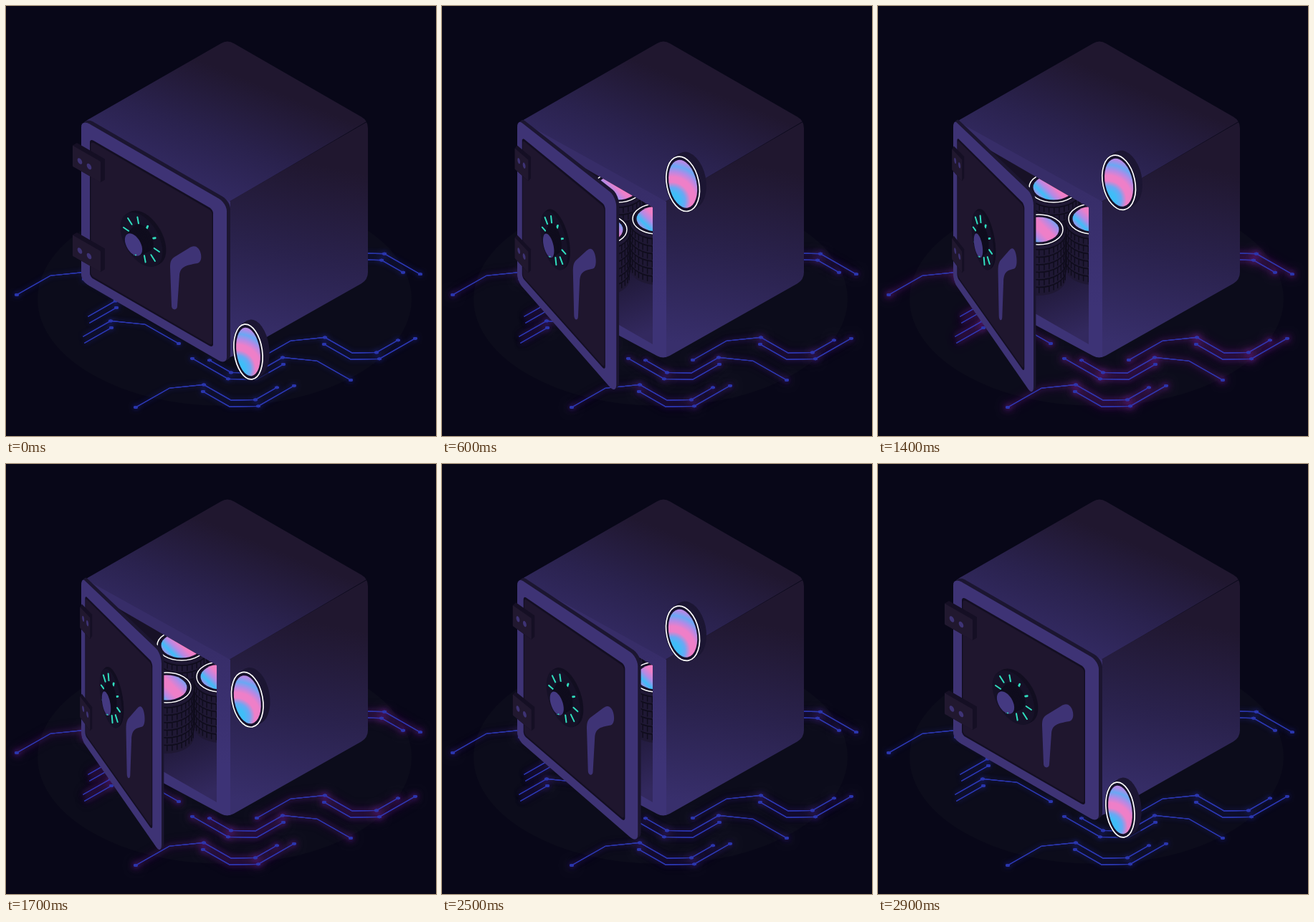
Write an HTML page with a canvas that moves like this. It is 600 by 600 pixels and loops after 3000 ms.

```html
<!DOCTYPE html>
<html lang="en">
<head>
<meta charset="utf-8">
<title>Vault</title>
<style>
html, body { margin: 0; width: 100%; height: 100%; overflow: hidden; background: #080718; }
canvas { display: block; width: 600px; height: 600px; }
</style>
</head>
<body>
<canvas id="stage" width="600" height="600"></canvas>
<script>
const ctx = document.getElementById('stage').getContext('2d');
const LOOP = 3000, STEP = 100;
const PURPLE = '#3e3375', DARK = '#1f162e', TEAL = '#30dfbf';
const PINK = '#ee7fc8', LILAC = '#b48ae6', SKY = '#6aa8f4', CYAN = '#3fbdf8';
const ISO = .577;
const TURNS = [0, 500, 985, 1500, 1950, 2450, 2900];

const mix = (a, b, k) => a + (b - a) * k;
const clamp = v => Math.min(1, Math.max(0, v));

// cubic-bezier(a, 0, 1 - a, 1), solved by bisection
function ease(x, a) {
  let lo = 0, hi = 1, t = x;
  for (let i = 0; i < 24; i++) {
    t = (lo + hi) / 2;
    const bx = 3 * a * t * (1 - t) ** 2 + 3 * (1 - a) * t * t * (1 - t) + t ** 3;
    if (bx < x) lo = t; else hi = t;
  }
  return t * t * (3 - 2 * t);
}
const ramp = (t, from, to, a) => ease(clamp((t - from) / (to - from)), a);

const doorAt = t => ramp(t, 50, 900, .42) - ramp(t, 2040, 2880, .42);
const glowAt = t => 1 - Math.abs(t - 1450) / 1450;
// the coin alternates between floor (0) and top (1)
function coinAt(t) {
  const i = Math.max(1, TURNS.findIndex(turn => t <= turn));
  const k = ramp(t, TURNS[i - 1], TURNS[i], .52);
  return i % 2 ? k : 1 - k;
}

function trace(pts) {
  ctx.beginPath();
  pts.forEach(p => ctx.lineTo(...p));
}

function fill(pts, color) {
  trace(pts);
  ctx.fillStyle = color;
  ctx.fill();
}

function rounded(pts, r) {
  const end = pts[pts.length - 1];
  ctx.beginPath();
  ctx.moveTo((end[0] + pts[0][0]) / 2, (end[1] + pts[0][1]) / 2);
  pts.forEach((p, i) => ctx.arcTo(...p, ...pts[(i + 1) % pts.length], r));
  ctx.closePath();
}

function oval(x, y, rx, ry, color, rot = 0) {
  ctx.beginPath();
  ctx.ellipse(x, y, rx, ry, rot, 0, 7);
  ctx.fillStyle = color;
  ctx.fill();
}

function ring(x, y, rx, ry, width, rot = 0) {
  ctx.beginPath();
  ctx.ellipse(x, y, rx, ry, rot, 0, 7);
  ctx.strokeStyle = '#fff';
  ctx.lineWidth = width;
  ctx.stroke();
}

// colours are spread evenly along the gradient
function spread(g, ...colors) {
  colors.forEach((c, i) => g.addColorStop(i / (colors.length - 1), c));
  return g;
}
const linear = (x0, y0, x1, y1, ...colors) =>
  spread(ctx.createLinearGradient(x0, y0, x1, y1), ...colors);

// Every circuit is the same pair of traces, mirrored or cut short.
function circuit(lines, dots, x, y, mx = 1, my = 1, legs = 5) {
  const run = (px, py, steps, nodeAt) => {
    const pts = [[px, py]];
    steps.forEach(([dx, slope]) => {
      px += dx * mx;
      py += dx * slope * my;
      pts.push([px, py]);
    });
    lines.push(pts);
    dots.push(...pts.filter((_, i) => nodeAt.includes(i)));
  };
  const up = -.57, down = .57;
  run(x, y, [[47, up], [48, -.1], [38, down], [34, -.02], [30, up]].slice(0, legs), [0, 2, 4, 5]);
  run(x + 94 * mx, y - 22 * my, [[37, down], [40, -.02], [50, up]].slice(0, legs - 2), [0, 2, 3].slice(0, legs - 2));
}

const lines = [], dots = [];
circuit(lines, dots, 15, 403);
circuit(lines, dots, 181, 560);
circuit(lines, dots, 350, 494);
circuit(lines, dots, 481, 522, -1);
circuit(lines, dots, 241, 471, -1, 1, 3);
circuit(lines, dots, 248, 443, -1, 1, 3);
circuit(lines, dots, 357, 344, 1, -1);

function drawCircuits(color, blur) {
  ctx.shadowColor = color;
  ctx.shadowBlur = blur;
  lines.forEach(pts => {
    trace(pts);
    ctx.stroke();
  });
  dots.forEach(([x, y]) => oval(x, y, 2.9, 1.9, ctx.strokeStyle));
}

function drawFloor(glow) {
  ctx.fillStyle = '#080718';
  ctx.fillRect(0, 0, 600, 600);
  oval(305, 409, 261, 149, '#0c0c1b');
  ctx.save();
  ctx.lineWidth = 1.2;
  ctx.strokeStyle = '#2a36ad';
  drawCircuits(`rgba(45,50,200,${.8 - .4 * glow})`, 7);
  for (const blur of [8, 15]) drawCircuits(`rgba(150,30,150,${glow})`, blur);
  ctx.restore();
}

function drawStack(x, y, base) {
  const rx = 38, ry = 23;
  ctx.beginPath();
  ctx.moveTo(x - rx, y);
  ctx.ellipse(x, base, rx, ry, 0, Math.PI, 0, true);
  ctx.lineTo(x + rx, y);
  ctx.fillStyle = '#1f1834';
  ctx.fill();
  ctx.beginPath();
  for (let row = y + 5; row < base - 4; row += 10.5) {
    for (let a = -1.5; a <= 1.5; a += .19) {
      const px = x + rx * Math.sin(a), py = row + ry * Math.cos(a);
      ctx.moveTo(px, py);
      ctx.lineTo(px, py + 7.5);
    }
    ctx.moveTo(x + rx, row);
    ctx.ellipse(x, row, rx, ry, 0, 0, Math.PI);
  }
  ctx.strokeStyle = '#0f0c1c';
  ctx.lineWidth = 1.5;
  ctx.stroke();
  oval(x, y, rx, ry, '#171228');
  ring(x, y, 34, 21, 1.5);
  oval(x, y, 28.5, 17.5, linear(x - 18, y + 18, x + 18, y - 18, LILAC, CYAN, LILAC, PINK, PINK, LILAC, SKY));
}

function drawBox() {
  ctx.save();
  rounded([[105, 164], [309, 47], [505, 160], [505, 382], [309, 493], [105, 384]], 18);
  ctx.clip();
  fill([[100, 160], [309, 40], [512, 156], [312, 273]],
    linear(350, 108, 280, 280, '#20172f', '#2a224e', '#352c67'));
  fill([[311, 273], [512, 157], [512, 390], [311, 500]],
    linear(430, 220, 378, 480, '#20172f', '#2a224d', '#382f6c'));
  fill([[100, 155], [313, 273], [313, 500], [100, 384]],
    linear(0, 250, 0, 420, '#372d68', '#3d3376'));
  trace([[118, 179], [294, 281], [294, 472], [118, 371]]);
  ctx.clip();
  ctx.fillStyle = linear(190, 300, 250, 470, '#171126', '#1f1837', '#33295f');
  ctx.fillRect(100, 150, 200, 340);
  drawStack(245, 253, 345);
  drawStack(300, 297, 366);
  drawStack(224, 312, 381);
  ctx.restore();
}

// Takes points on the shut door and projects them for the opening k.
function doorMap(k) {
  const w = 203 - 91 * (.85 * k + .15 * k * k);
  const top = 117 - 11 * (1.5 * k - .5 * k * k);
  const bottom = 117 + 44 * (1.97 * k - .97 * k * k);
  const grow = bottom - top, depth = 228 / (228 + grow);
  return ([x, y]) => {
    const u = (x - 105) / 203, v = (y - 156 - 117 * u) / 228;
    const s = u * depth / (1 - u + depth * u);
    return [105 + s * w, 156 + s * top + v * (228 + s * grow)];
  };
}

const skew = (x, y) => [x, y + ISO * (x - 105)];

// rounded rectangle lying in the door plane
function plate(l, t, r, b, rad) {
  const pts = [];
  for (let i = 0; i < 28; i++) {
    const corner = Math.floor(i / 7), a = (corner + i % 7 / 6) * Math.PI / 2;
    const cx = corner === 0 || corner === 3 ? r - rad : l + rad;
    const cy = corner < 2 ? b - rad : t + rad;
    pts.push(skew(cx + rad * Math.cos(a), cy + rad * Math.sin(a)));
  }
  return pts;
}

function drawDoor(k) {
  const map = doorMap(k);
  const shape = (pts, color) => fill(pts.map(map), color);
  const onDial = (x, y, r, a) => [x + .866 * r * Math.cos(a), y + .5 * r * Math.cos(a) + r * Math.sin(a)];
  const disc = (x, y, r, color) =>
    shape(Array.from({ length: 40 }, (_, i) => onDial(x, y, r, i * Math.PI / 20)), color);

  const face = plate(105, 158, 308, 384, 11).map(map);
  for (let i = 4; i > 0; i--) {
    fill(face.map(([x, y]) => [x + i * (1.25 - .4 * k), y - i * .75]), '#1c1631');
  }
  fill(face, PURPLE);
  shape(plate(117, 178, 289, 371, 5), '#130e22');
  shape(plate(118.5, 181, 287.5, 368.5, 4), DARK);

  const left = 93 + 8 * k;
  for (const y of [201.5, 326.5]) {
    const top = y - 7, bottom = y + 22;
    shape([skew(left, top + 7), skew(left + 6, top), skew(138, top), skew(138, bottom), skew(132, bottom + 7), skew(left, bottom + 7)], '#150f24');
    shape(plate(left, y, 132, bottom + 7, 1), '#21182f');
    disc(left + 10, y + 15, 3.8, PURPLE);
    disc(left + 23, y + 22.5, 3.8, PURPLE);
  }

  for (let i = 5; i >= 0; i--) disc(189 + i, 326 - i * .5, 34, i ? '#120e20' : '#161127');
  ctx.lineCap = 'round';
  ctx.strokeStyle = TEAL;
  for (let i = 0; i < 10; i++) {
    const a = (5 + 36 * i) * Math.PI / 180, thick = i > 7;
    trace([thick ? 22 : 20.5, thick ? 26 : 29].map(r => map(onDial(189, 326, r, a))));
    ctx.lineWidth = thick ? 2.8 : 2;
    ctx.stroke();
  }
  for (let i = 8; i >= 0; i--) disc(178 + i * 1.6, 333 - i * 1.2, 14 + i * .4, '#0f0c1d');
  disc(178, 333, 14, '#443981');
  oval(...map([181, 347.5]), 1, 1, TEAL);

  const curve = (a, b, c) => ctx.bezierCurveTo(...map(a), ...map(b), ...map(c));
  ctx.beginPath();
  ctx.moveTo(...map([231, 418]));
  curve([231, 425], [239, 425], [239, 419]);
  ctx.lineTo(...map([242, 376]));
  curve([243, 364], [250, 362], [267, 359]);
  curve([275, 357], [273, 343], [268, 338]);
  curve([264, 334], [260, 335], [255, 338]);
  ctx.lineTo(...map([237, 349]));
  curve([230, 353], [229, 357], [229, 365]);
  ctx.fillStyle = PURPLE;
  ctx.fill();
}

function drawCoin(k) {
  const x = mix(338, 336, k), y = mix(482.5, 232, k);
  const rx = mix(19.6, 22.6, k), tilt = mix(-.14, -.21, k);
  oval(347, 514, 20, 10, `rgba(20,16,38,${.7 * clamp(1 - k * 4)})`);
  for (let i = 8; i >= 0; i--) oval(x + i, y - i * .65, rx + 1.6, 40, i ? '#1c1633' : '#17122b', tilt);
  ring(x, y, rx, 38.7, 1.7, tilt);
  const shine = ctx.createRadialGradient(x - 16, y + 24, 4, x - 16, y + 24, 64);
  oval(x, y, rx - 3.2, 34, spread(shine, CYAN, CYAN, SKY, PINK, PINK, LILAC, SKY, LILAC, LILAC), tilt);
}

function frame(now) {
  const t = Math.floor(now % LOOP / STEP) * STEP;
  drawFloor(glowAt(t));
  drawBox();
  drawDoor(doorAt(t));
  drawCoin(coinAt(t));
}

const start = performance.now();
function tick() {
  frame(performance.now() - start);
  requestAnimationFrame(tick);
}
tick();
</script>
</body>
</html>
```
